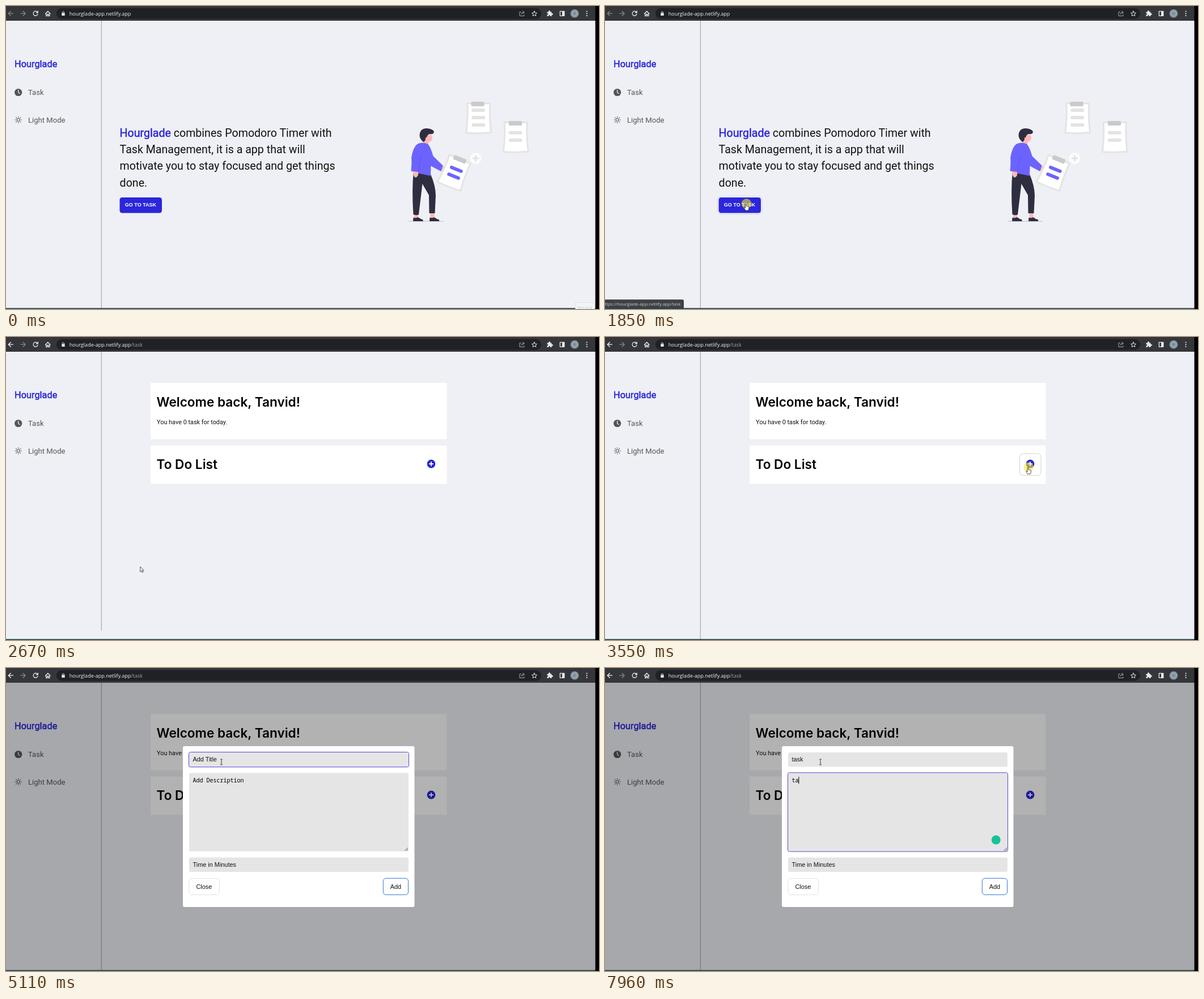
An HTML page that plays this animation: 1046x535 px, repeating every 8000 ms.

```html
<!DOCTYPE html>
<html lang="en">
<head>
<meta charset="utf-8">
<title>Task app demo</title>
<style>
html, body { margin: 0; width: 100%; height: 100%; overflow: hidden; background: #eff0f5; }
svg { display: block; width: 1046px; height: 535px; }
text { white-space: pre; }
.ui { font-family: "Open Sans", "Noto Sans", sans-serif; }
.body { font-family: Roboto, sans-serif; }
.head { font: 600 22.6px Inter, sans-serif; }
.form { font: 10.9px "Liberation Sans", Arial, sans-serif; }
.mono { font: 10px "Noto Sans Mono", "DejaVu Sans Mono", monospace; }
.brand { fill: #2b26db; stroke: #2b26db; stroke-width: .5px; }
.menu { font-size: 13.1px; fill: #555; }
.line { fill: none; stroke: currentColor; stroke-linecap: round; stroke-linejoin: round; }
.field { fill: #e5e5e5; }
.focus { fill: none; stroke: #5148d8; }
</style>
</head>
<body>
<svg viewBox="0 0 1046 535">
  <defs>
    <radialGradient id="photo">
      <stop offset="0" stop-color="#6d7f8d"/>
      <stop offset=".6" stop-color="#9aa9b3"/>
      <stop offset="1" stop-color="#74828c"/>
    </radialGradient>
    <g id="arrow-left" class="line" stroke-width="1.3"><path d="M4-0H-4M-.2-4-4.2 0-.2 4"/></g>
    <path id="sheet" d="M-20-25.500H20.500Q18.500-8 22 26Q0 28-21.500 26.500Q-18-8-20-25.500Z"
      fill="#fff" stroke="#e4e4e4" stroke-width="3" stroke-linejoin="round"/>
    <rect id="clip" x="-11.500" y="-4" width="23" height="8" rx="1.500" fill="#cacaca"/>
    <rect id="bar" x="-12" y="-3" width="24" height="6" rx="3"/>
  </defs>

  <!-- page -->
  <rect width="1046" height="535" fill="#eff0f5"/>
  <path d="M168.300 26V534" stroke="#9b9da3"/>
  <g class="body">
    <text class="brand" x="15" y="107.500" font-size="16.350">Hourglade</text>
    <text class="menu" x="39" y="157">Task</text>
    <text class="menu" x="39" y="205.500">Light Mode</text>
  </g>
  <circle cx="21.700" cy="152.500" r="6.600" fill="#555"/>
  <path d="M21.700 148.500V152.800L24.300 154.500" class="line" color="#eff0f5" stroke-width="1.300"/>
  <g transform="translate(21.700 201)" class="line" color="#555" stroke-width="1.100">
    <circle r="2.500"/>
    <path id="rays"/>
  </g>

  <!-- home -->
  <g data-on="0-1990">
    <g class="body" font-size="19.600" fill="#111">
      <text x="200.600" y="230.500"><tspan class="brand">Hourglade</tspan> combines Pomodoro Timer with</text>
      <text x="200.600" y="259.900">Task Management, it is a app that will</text>
      <text x="200.600" y="289.300">motivate you to stay focused and get things</text>
      <text x="200.600" y="318.700">done.</text>
    </g>
    <g data-on="1790-1990" fill="none">
      <rect x="198.700" y="336.200" width="78" height="31" rx="6" stroke="#b5b7cf" stroke-width=".8"/>
      <rect x="199.700" y="337.200" width="76" height="29" rx="5.500" stroke="#fff" stroke-width="1.200"/>
    </g>
    <rect x="200.500" y="338" width="74.500" height="27.500" rx="4.500" fill="#2b26db"/>
    <text x="209.800" y="354.300" class="form" style="font-size:9px;font-weight:700" fill="#fff">GO TO TASK</text>

    <use href="#sheet" x="833.500" y="197.500"/>
    <use href="#clip" x="832" y="173"/>
    <g fill="#e3e3e3">
      <use href="#bar" x="833.300" y="184"/>
      <use href="#bar" x="833.300" y="197"/>
      <use href="#bar" x="833.300" y="210"/>
    </g>
    <use href="#sheet" x="899" y="231"/>
    <use href="#clip" x="898.500" y="207"/>
    <g fill="#e3e3e3">
      <use href="#bar" x="898.700" y="223.800"/>
      <use href="#bar" x="898.700" y="237"/>
    </g>
    <circle cx="828.500" cy="269" r="10" fill="#fcfcfd"/>
    <path d="M823 269H834M828.500 263.500V274.500" stroke="#e3e3e6" stroke-width="3"/>

    <path d="M710 380.200H772" stroke="#c9c5d0" stroke-width="1.200"/>
    <path d="M720 365H727V375H720ZM748.500 362H755.500V375H748.500Z" fill="#ffb8b8"/>
    <path d="M718.500 373.500Q723 375 727 373Q731 376 735 377Q736.500 380 735 380H718Z
      M747.500 373.500Q752 375 755.500 373Q759 376 763.500 377Q765 380 763.500 380H747Z" fill="#2f2e41"/>
    <path d="M719 291 749 297Q758 318 758 335L756.500 366H746.500L746 334 734.500 314 732 335 728 368.500Q722 370 718.500 368Q715.500 325 719 291Z" fill="#2f2e41"/>
    <path d="M739 228H751Q753 235 750.500 238L746.500 240 744 245 737 242Z" fill="#ffb8b8"/>
    <path d="M737 240.500Q729 235 729.500 227Q731 216 742 216Q754 217 755 222.500Q754.500 227 746.500 226Q743 228 742 232Q739 232 740 236Z" fill="#2f2e41"/>
    <path d="M765 281.500Q772 281 775 285Q775 291 770 293Z" fill="#ffb8b8"/>
    <path d="M718.500 291H727.500Q728.500 300 723 303Q717 301 718.500 291Z" fill="#ffb8b8"/>
    <path d="M726 243.500Q734 239.500 744 243.500Q749 249 753.500 265L770.500 281.500 767.500 292 749.500 282.500 749 300 728 295.500 727 293 714.500 291.500Q716 275 715 268Q718 249 726 243.500Z" fill="#6c63ff"/>
    <path d="M733 264Q729 277 727.300 293" fill="none" stroke="#5750d4" stroke-width=".7"/>
    <g transform="translate(791 294) rotate(22)">
      <use href="#sheet"/>
      <use href="#clip" x="0" y="-25"/>
      <g fill="#6c63ff">
        <use href="#bar" x="1" y="-6.500"/>
        <use href="#bar" x="1" y="6.500"/>
      </g>
    </g>
  </g>

  <!-- task list -->
  <g data-on="1990-8000">
    <path d="M255 81H777.500V180.500H255ZM255 191.500H777.500V259.300H255Z" fill="#fff"/>
    <text class="head" x="265.500" y="123">Welcome back, Tanvid!</text>
    <text class="body" x="266" y="154" font-size="10.900" fill="#111">You have 0 task for today.</text>
    <text class="head" x="265.500" y="233">To Do List</text>
    <rect data-on="3420-4580" x="731.500" y="206" width="37.500" height="38.300" rx="5.500" fill="none" stroke="#cfd1d6"/>
    <circle cx="750" cy="224" r="7.400" fill="#2b26db"/>
    <path d="M746.200 224H753.800M750 220.200V227.800" stroke="#fff" stroke-width="2"/>
  </g>

  <!-- link preview -->
  <g id="status" data-on="1450-3420">
    <rect id="statusBox" x="-5" y="518.300" height="20" rx="2.500"/>
    <text id="statusText" class="ui" x="133.500" y="529" text-anchor="end" font-size="7.850" fill="#c9cbcf">https://hourglade-app.netlify.app/task</text>
  </g>

  <!-- dialog -->
  <g data-on="3680-8000">
    <rect y="26" width="1040" height="508" fill="#000" opacity=".3"/>
    <rect x="312" y="138" width="408.500" height="284" rx="3" fill="#fff"/>
    <rect class="field" x="323" y="149" width="387" height="25.500" rx="3"/>
    <rect class="field" x="323" y="185.300" width="387" height="138.400" rx="3"/>
    <rect class="field" x="323" y="334.500" width="387" height="25.500" rx="3"/>
    <rect class="focus" data-on="4580-7490" x="322.500" y="148.500" width="388" height="26.300" rx="3"/>
    <rect class="focus" data-on="7490-8000" x="322.500" y="184.800" width="388" height="139.300" rx="3"/>
    <path d="M703.500 322.500 709 317.500M706.500 322.800 709 320.500" stroke="#555"/>
    <g fill="none">
      <rect x="323" y="371.300" width="53.300" height="29" rx="5" stroke="#e0e1e5"/>
      <rect x="665.300" y="371.300" width="44.300" height="29" rx="5" stroke="#2f76d2"/>
    </g>
    <g class="form" fill="#111">
      <text x="329.500" y="165" data-on="0-5640">Add Title</text>
      <text id="title" x="329.500" y="165"></text>
      <text x="329.500" y="351">Time in Minutes</text>
      <text x="335.500" y="389.500">Close</text>
      <text x="677.700" y="389.500">Add</text>
    </g>
    <g class="mono">
      <text x="329.500" y="201.800" data-on="0-7820">Add Description</text>
      <text id="note" x="329.500" y="201.800"></text>
    </g>
    <rect id="titleCaret" data-on="4580-5110 5640-6760 7290-7490" y="155.500" width="1" height="12"/>
    <rect id="noteCaret" data-on="7490-8000" y="192" width="1" height="12.500"/>
    <circle data-on="7820-8000" cx="689.700" cy="303.500" r="8" fill="#15c39a"/>
  </g>

  <!-- browser -->
  <rect width="1040" height="26" fill="#35363a"/>
  <rect x="89" y="3.800" width="855" height="19" rx="9.500" fill="#202124"/>
  <use data-on="0-1990" href="#arrow-left" x="8.500" y="13.200" color="#85878b"/>
  <use data-on="1990-8000" href="#arrow-left" x="8.500" y="13.200" color="#f1f1f2"/>
  <use href="#arrow-left" transform="translate(30 13.200) scale(-1 1)" color="#85878b"/>
  <g class="line" color="#e8eaed" stroke-width="1.300">
    <path d="M55.600 11.200A4 4 0 1 0 56 14.300M56.300 8.800V11.800H53.200"/>
    <path d="M69.500 13.500 73.800 9.300 78 13.500M70.800 12.600V17.500H72.800V14.500H74.800V17.500H76.800V12.600"/>
    <path d="M932 9 933.300 12 936.500 12.300 934.100 14.400 934.800 17.600 932 15.900 929.200 17.600 929.900 14.400 927.500 12.300 930.700 12Z" stroke-width="1"/>
    <path d="M908.500 10.500H906V17.500H914V15.500M908.800 14.500Q909.500 11.200 913 11.200M911.500 9 914.500 11.300 911.500 13.500" stroke-width=".9" color="#b5b8bd"/>
    <rect x="977.300" y="9.300" width="7.500" height="8"/>
    <path d="M99.500 12.500V11Q101 8 102.500 11V12.500" stroke-width="1"/>
  </g>
  <g fill="#e8eaed">
    <rect x="98.300" y="12.300" width="5.400" height="4.700" rx=".6"/>
    <path d="M981 9H985V17.500H981Z"/>
    <path d="M954.500 10.500H957Q956.500 8 958.500 8T960 10.500H962.500V13Q965 12.500 965 14.300T962.500 15.500V18H960Q959.800 16 958.500 16T957 18H954.500V15.500Q956.500 15.300 956.500 14.200T954.500 13Z"/>
    <circle cx="1024.500" cy="9.500" r="1.100"/>
    <circle cx="1024.500" cy="13.300" r="1.100"/>
    <circle cx="1024.500" cy="17.100" r="1.100"/>
  </g>
  <circle cx="1003" cy="13.200" r="7.500" fill="url(#photo)"/>
  <text class="ui" x="111.700" y="16.800" font-size="9.050" fill="#f0f1f3">hourglade-app.netlify.app<tspan data-on="1990-8000" fill="#9aa0a6">/task</tspan></text>
  <rect y="533.300" width="1046" height="2" fill="#1f4850"/>
  <rect x="1039.500" width="7" height="535" fill="#000"/>
  <g data-on="0-70">
    <rect x="1004.500" y="523.500" width="34" height="13" fill="#f3f4f7" stroke="#dfe1e6"/>
    <text class="ui" x="1008" y="534.500" font-size="8" fill="#c3cede">Record</text>
  </g>

  <!-- pointer -->
  <g id="pointer" data-on="510-8000">
    <circle data-on="1790-1990 3420-3680" cx="1" cy="0" r="8.800" fill="#f7ec28" opacity=".58"/>
    <circle data-on="4580-4780" r="8.800" fill="#f7ec28" opacity=".58"/>
    <path data-on="510-1180 1990-3300 3680-4400" d="M0 0V9L2.100 7.100 3.500 10.200 5 9.500 3.600 6.500H6.400Z" fill="#fff" stroke="#222" stroke-width=".8"/>
    <path data-on="1180-1990 3300-3680" d="M-.9 1Q0-.3.900 1V4.300Q2.200 3.600 2.600 4.700Q3.900 4.200 4.200 5.300Q5.600 5.100 5.500 6.700Q5.500 9.500 4.200 12H-.7Q-1.800 9.500-3.200 7.800Q-3.300 6.300-1.900 6.900L-.9 8Z" fill="#fff" stroke="#222" stroke-width=".8"/>
    <path data-on="4400-8000" d="M-2-4.800H-.6L0-4.300.600-4.800H2M0-4.300V4.300M-2 4.800H-.6L0 4.300.600 4.800H2" fill="none" stroke="#222" stroke-width=".9"/>
  </g>
</svg>
<script>
const LOOP = 8000;
const $ = id => document.getElementById(id);

$('rays').setAttribute('d', Array.from({ length: 8 }, (_, i) => {
  const c = Math.cos(i * Math.PI / 4), s = Math.sin(i * Math.PI / 4);
  return `M${4.4 * c} ${4.4 * s}L${5.8 * c} ${5.8 * s}`;
}).join(''));

const timed = [...document.querySelectorAll('[data-on]')].map(el => ({
  el, spans: el.dataset.on.split(' ').map(s => s.split('-').map(Number))
}));

// time, x, y
const path = [
  [510, 565, 480], [1250, 248.5, 349], [1920, 248.5, 349], [2200, 241.5, 428],
  [2530, 230, 418], [2600, 224, 410], [3360, 746, 230], [4010, 746, 230],
  [4520, 380, 166], [8000, 380, 166]
];

const clamp = v => Math.min(1, Math.max(0, v));
const ramp = (t, a, b) => clamp((t - a) / (b - a));
const mix = (a, b, k) => a + (b - a) * k;
const ease = k => k * k * (3 - 2 * k);

function pointerAt(t) {
  const i = Math.max(1, path.findIndex(p => p[0] > t));
  const [a, b] = [path[i - 1], path[i]];
  const k = ease(ramp(t, a[0], b[0]));
  return [mix(a[1], b[1], k), mix(a[2], b[2], k)];
}

function type(id, word, times, t) {
  const el = $(id);
  el.textContent = word.slice(0, times.filter(x => x <= t).length);
  const width = el.textContent ? el.getComputedTextLength() : 0;
  $(id + 'Caret').setAttribute('x', 329.3 + width);
}

function drawStatus(t) {
  const fade = ramp(t, 2130, 2340);
  const shade = [[63, 239], [65, 240], [69, 245]].map(([a, b]) => mix(a, b, fade ** 2.2));
  $('statusBox').setAttribute('width', mix(144, 346, ramp(t, 1990, 2130)));
  $('statusBox').setAttribute('fill', `rgb(${shade})`);
  $('statusText').setAttribute('opacity', 1 - fade ** 2);
  $('status').setAttribute('opacity', t < 1520 ? .6 : 1);
}

function draw(t) {
  for (const { el, spans } of timed)
    el.style.display = spans.some(([a, b]) => t >= a && t < b) ? '' : 'none';
  $('pointer').setAttribute('transform', `translate(${pointerAt(t)})`);
  type('title', 'task', [5640, 5790, 5970, 6240], t);
  type('note', 'ta', [7820, 7960], t);
  drawStatus(t);
}

const start = performance.now();
function tick() {
  draw((performance.now() - start) % LOOP);
  requestAnimationFrame(tick);
}
tick();
</script>
</body>
</html>
```
